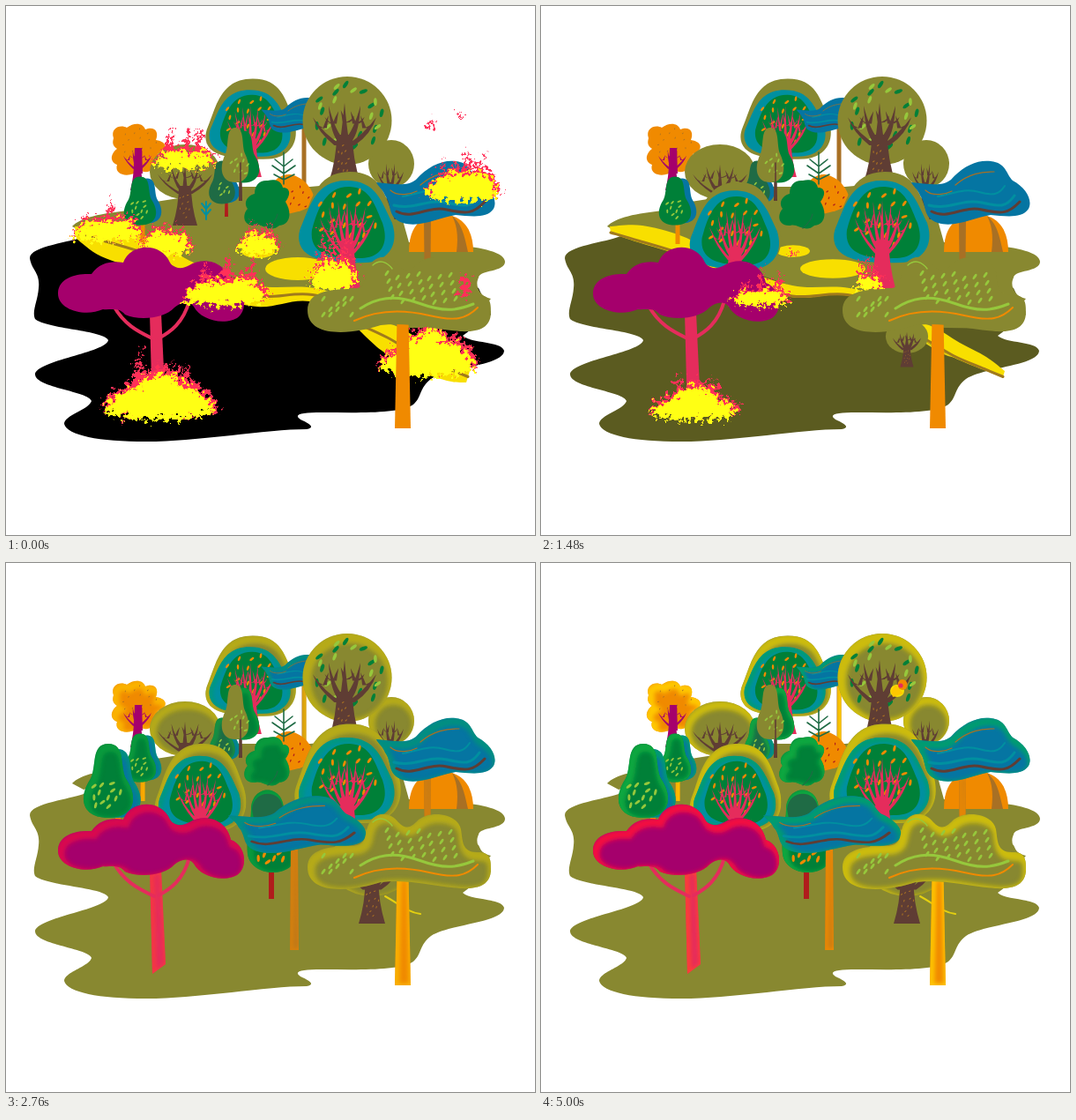
An HTML page for the animation above (6 s loop, 600 by 600 pixels).

```html
<!DOCTYPE html>
<html lang="en">
<head>
<meta charset="utf-8">
<title>Forest regrowth</title>
<style>
html, body { margin: 0; width: 100%; height: 100%; overflow: hidden; background: #fff; }
svg { display: block; width: 100vw; height: 100vh; }
.hi { opacity: var(--glow); }
</style>
</head>
<body>
<svg id="stage" viewBox="0 0 600 600">
  <defs>
    <filter id="soft" x="-20%" y="-20%" width="140%" height="140%"><feGaussianBlur stdDeviation="2.6"/></filter>
    <filter id="spray" filterUnits="userSpaceOnUse" x="0" y="80" width="600" height="420" color-interpolation-filters="sRGB">
      <feTurbulence id="grain" type="fractalNoise" baseFrequency=".2" numOctaves="4"/>
      <feDisplacementMap in="SourceGraphic" scale="24" xChannelSelector="R" yChannelSelector="G"/>
    </filter>
  </defs>
</svg>
<script>
const LOOP = 6000, STEP = 40;
const C = {
  olive: '#888830', gold: '#ccbc10', brown: '#5f3d34', bark: '#a87024', blue: '#0575a2', teal: '#0090a0',
  green: '#008038', leaf: '#10a840', deep: '#1f6b45', magenta: '#a5006c', red: '#f41040', pink: '#e52c5c',
  orange: '#f08a00', sun: '#ffc800', yellow: '#f8df00', lime: '#96c83c', sea: '#009c70', rust: '#b01c1c',
  flame: '#ff3058', hot: '#ffff14'
};
const svg = document.getElementById('stage');
const defs = svg.querySelector('defs');
const clamp = v => Math.max(0, Math.min(1, v));
const mix = (a, b, k) => a + (b - a) * k;
const span = (t, a, b) => clamp((t - a) / (b - a));
const rnd = n => { const v = Math.sin(n * 12.9898 + 4.1) * 43758.5453; return v - Math.floor(v); };

function el(tag, attrs, parent) {
  const e = document.createElementNS('http://www.w3.org/2000/svg', tag);
  for (const k in attrs) e.setAttribute(k, attrs[k]);
  return parent.appendChild(e);
}
const group = (parent = svg) => el('g', {}, parent);
const fill = (p, d, color) => el('path', { d, fill: color }, p);
const line = (p, d, color, w) => el('path', { d, fill: 'none', stroke: color, 'stroke-width': w, 'stroke-linecap': 'round' }, p);

let clips = 0;
// Shape with a soft inner light along its upper left side
function lit(p, d, color, light, w = 10) {
  const id = 'c' + clips++;
  fill(p, d, color);
  el('path', { d }, el('clipPath', { id }, defs));
  const g = el('g', { 'clip-path': `url(#${id})`, class: 'hi' }, p);
  const shift = w > 8 ? 'translate(2.5 4)' : 'translate(1.5 1.5)';
  el('path', { d, fill: 'none', stroke: light, 'stroke-width': w, filter: 'url(#soft)', transform: shift }, g);
}
const oval = (x, y, a, b) => `M${x - a} ${y}a${a} ${b} 0 1 1 ${2 * a} 0a${a} ${b} 0 1 1 ${-2 * a} 0Z`;
function pear(x, y, w, h) {
  const q = (...n) => n.map((v, i) => (i % 2 ? y + v * h : x + v * w).toFixed(1)).join(' ');
  return `M${q(0, -.5)}C${q(.36, -.5, .22, -.18, .36, -.02)}C${q(.62, .25, .5, .5, 0, .5)}` +
    `C${q(-.5, .5, -.62, .25, -.36, -.02)}C${q(-.22, -.18, -.36, -.5, 0, -.5)}Z`;
}
const post = (x, top, base, a, b) => `M${x - a} ${top}H${x + a}L${x + b} ${base}H${x - b}Z`;

// Tapered branch
const limb = (x, y, cx, cy, tx, ty, w) =>
  `M${x - w} ${y}Q${cx - w * .7} ${cy} ${tx} ${ty}Q${cx + w * .7} ${cy + w * .5} ${x + w} ${y}Z`;

// Trunk with a fan of branches
function fan(p, x, top, base, w, rx, ry, n, color, sw) {
  const m = (top + base) / 2;
  let d = `M${x - w} ${base}Q${x - w * .5} ${m} ${x - w * .5} ${top}H${x + w * .5}Q${x + w * .5} ${m} ${x + w} ${base}Z`;
  for (let i = 0; i < n; i++) {
    const a = i / (n - 1) * 2 - 1, tx = x + a * rx, ty = top - ry * Math.sqrt(1 - a * a * .7);
    const ox = x + a * w * .4, oy = top + Math.abs(a) * ry * .25 + 3;
    const cx = x + a * rx * .75, cy = mix(top, ty, .15);
    d += limb(ox, oy, cx, cy, tx, ty, sw);
    const bx = mix(x, tx, .62), by = mix(top, ty, .38), s = a < 0 ? 1 : -1;
    d += limb(bx, by, bx + s * rx * .04, by - ry * .2, bx + s * rx * .12, by - ry * .4, sw * .5);
    d += limb(bx, by, bx - s * rx * .2, by - ry * .02, bx - s * rx * .32, by - ry * .22, sw * .5);
  }
  fill(p, d, color);
}
function scatter(p, x, y, rx, ry, n, color, len, inner = .1, seed = 1) {
  for (let i = 0; i < n; i++) {
    const a = i * 2.4 + seed, r = mix(inner, 1, Math.sqrt((i + .5) / n));
    const px = x + Math.cos(a) * rx * r, py = y + Math.sin(a) * ry * r;
    el('ellipse', { rx: len, ry: len * .42, fill: color,
      transform: `translate(${px.toFixed(1)} ${py.toFixed(1)}) rotate(${Math.round(-100 + rnd(i) * 80)})` }, p);
  }
}

// Ground
const base = fill(svg, 'M90 261C75 268 27 272 27 286C29 300 39 302 37 320C36 335 29 346 33 355C45 366 112 368 116 379C114 393 34 402 33 418C34 433 94 437 97 448C94 458 66 464 66 474C70 488 110 495 170 494C240 491 300 480 341 480C351 478 345 474 334 469C325 463 336 461 358 461C400 461 445 463 462 452C472 443 468 434 482 423C505 409 564 408 565 391C562 380 528 383 518 374L550 350L536 320L400 250Z', '#000');
fill(svg, 'M75 250C84 240 108 235 140 232L170 222L215 215L240 205H345L400 200L445 225L457 268L510 272C540 273 566 280 566 290C566 302 537 299 536 308C531 318 538 330 550 332L520 366L395 364L350 322L285 318L215 293L165 264L115 250L88 257Z', C.olive);
line(svg, 'M430 378C445 386 455 396 470 398', '#e4d010', 2);
const ponds = [[331, 298, 37, 13], [286, 278, 19, 8]].map(([cx, cy, rx, ry]) =>
  ({ ry, e: el('ellipse', { cx, cy, rx, ry, fill: C.yellow }, svg) }));

const smooth = pts => pts.map((p, i) => {
  if (!i) return p.join(' ');
  const a = pts[i - 2] || pts[i - 1], b = pts[i - 1], c = pts[i + 1] || p;
  return `C${b[0] + (p[0] - a[0]) / 6} ${b[1] + (p[1] - a[1]) / 6} ${p[0] - (c[0] - b[0]) / 6} ${p[1] - (c[1] - b[1]) / 6} ${p[0]} ${p[1]}`;
}).join('');
const banks = [
  [[[78, 250], [115, 249], [165, 263], [215, 292], [285, 317], [350, 320], [420, 340]],
   [[80, 264], [108, 284], [160, 302], [215, 325], [285, 341], [345, 335], [420, 360]]],
  [[[395, 355], [440, 362], [475, 382], [505, 398], [526, 414]],
   [[395, 362], [425, 390], [460, 411], [500, 425], [522, 427]]]
].map(([up, low]) => ({ up, low, band: fill(svg, '', C.yellow), mid: line(svg, '', '#a07a1c', 3) }));
const between = (a, b, k) => a.map((p, i) => [mix(p[0], b[i][0], k), mix(p[1], b[i][1], k)]);

// Tree kinds
const rims = [];
const swell = k => `translate(388 250) scale(${1 + .09 * k}) translate(-388 -250)`;
function tealTree(p, x, y, sx, sy, grows) {
  const g = el('g', { transform: `translate(${x} ${y}) scale(${sx} ${sy}) translate(-388 -320)` }, p);
  const rim = el('g', { transform: swell(grows ? 0 : 1) }, g);
  if (grows) rims.push(rim);
  lit(rim, 'M335 250C345 225 350 188 390 188C425 188 430 215 440 240C450 272 432 290 410 291C375 292 350 290 338 278C331 270 331 260 335 250Z', C.olive, C.gold, 12);
  lit(g, 'M334 252C344 230 350 198 386 198C420 198 426 222 438 246C447 274 430 290 409 291C375 292 350 290 338 278C331 270 331 260 334 252Z', C.teal, C.sea, 8);
  fill(g, 'M347 254C354 228 364 204 390 205C414 206 419 228 427 246C435 270 425 285 404 286C375 287 343 284 347 254Z', C.green);
  scatter(g, 388, 240, 36, 34, 20, C.orange, 3.6, .15, 2);
  fan(g, 387, 266, 320, 15, 31, 46, 7, C.pink, 2.6);
}
function blueTree(p, x, y, sx, sy) {
  const g = el('g', { transform: `translate(${x} ${y}) scale(${sx} ${sy}) translate(-487 -212)` }, p);
  lit(g, 'M420 200C440 202 455 205 465 197C478 182 495 174 510 176C528 178 527 190 535 198C550 206 558 220 553 230C545 242 525 238 510 237C490 240 470 252 450 246C432 240 438 225 430 215C427 207 422 205 420 200Z', C.blue, C.sea);
  line(g, 'M443 233C462 243 478 226 500 231S530 236 543 222', C.brown, 3);
  line(g, 'M440 226C462 232 478 218 500 223S528 228 537 215', C.teal, 3);
  line(g, 'M450 216C468 213 480 206 497 211S520 213 526 204', C.teal, 2);
  line(g, 'M470 203C485 190 500 188 514 188M436 209C445 217 460 213 466 210', C.bark, 1.2);
}

// Far trees
const far = group();
tealTree(far, 278, 194, .85, .81);
lit(far, post(338, 130, 204, 2.5, 2.5), C.bark, C.sun, 5);
blueTree(far, 330, 124, .6, .55);
fill(far, 'M291 236C292 206 308 190 322 191C340 194 351 212 350 224C335 236 310 238 291 236Z', C.orange);
scatter(far, 332, 217, 14, 13, 8, C.rust, 1.6, .2, 3);
line(far, 'M315 166V202M315 182L305 174M315 182L325 174M315 190L302 181M315 190L328 181M315 197L304 191M315 197L327 191', C.deep, 1.6);
lit(far, oval(437, 179, 26, 27), C.olive, C.gold);
fan(far, 436, 200, 242, 7, 15, 22, 4, C.brown, 2);
lit(far, oval(387, 130, 50.5, 50), C.olive, C.gold, 14);
scatter(far, 387, 126, 42, 38, 14, C.green, 4.8, .55, 1);
scatter(far, 388, 122, 38, 34, 10, C.lime, 4.4, .5, 4);
fan(far, 384, 146, 200, 18, 36, 36, 5, C.brown, 4.5);
scatter(far, 382, 174, 8, 17, 11, C.bark, 1.5, .1, 2);

const bird = group();
fill(bird, oval(404, 145, 8, 7), C.yellow);
fill(bird, oval(410, 138, 5.5, 6), C.orange);
fill(bird, 'M397 145L402 138L411 148L399 152Z', C.sun);
fill(bird, oval(408, 139, 2.6, 2.6), C.pink);

lit(far, 'M122 150C118 138 130 134 137 138C145 132 155 132 158 140C168 136 174 142 170 152C184 154 184 164 172 168C172 186 160 192 152 186C140 196 122 192 126 180C116 176 120 166 126 162C120 158 121 154 122 150Z', C.orange, C.sun);
scatter(far, 150, 155, 22, 16, 14, C.bark, 1.1, .2, 5);
fan(far, 149, 178, 209, 8, 16, 15, 4, C.magenta, 1.8);
fill(far, 'M146 161H154L155 190H145Z', C.magenta);

const middle = group();
lit(middle, oval(203, 188, 40, 31), C.olive, C.gold);
fan(middle, 203, 204, 249, 14, 31, 24, 5, C.brown, 2.8);
scatter(middle, 203, 226, 7, 15, 10, C.bark, 1.3, .1, 1);
fill(middle, post(250, 220, 239, 1.6, 2), C.rust);
lit(middle, pear(250, 200, 30, 47), C.blue, C.sea, 8);
lit(middle, pear(245, 200, 30, 49), C.deep, C.leaf, 8);
scatter(middle, 246, 208, 8, 8, 6, C.lime, 2.2);
line(middle, 'M227 242V222M227 230l-5-6M227 230l5-6M227 237l-5-6M227 237l5-6', C.teal, 2);
fill(middle, post(266, 185, 221, 1.5, 2), C.brown);
lit(middle, pear(269, 171, 37, 59), C.green, C.leaf, 8);
fill(middle, pear(260, 169, 31, 62), C.olive);
scatter(middle, 266, 180, 11, 13, 9, C.lime, 2.4, .1, 3);
line(middle, 'M266 208V178', C.brown, 1.6);
lit(middle, 'M297 198C305 196 312 198 314 206C324 206 322 216 317 222C325 235 322 248 310 249C300 258 290 246 283 249C268 250 268 236 274 230C268 222 276 214 282 213C282 203 288 197 297 198Z', C.green, C.leaf);
line(middle, 'M297 252C304 246 307 241 308 236', C.deep, 1.2);
lit(middle, post(155, 240, 270, 2.5, 2.5), C.orange, C.sun, 4);
lit(middle, pear(160, 221, 33, 51), C.blue, C.sea, 8);
lit(middle, pear(152, 221, 37, 55), C.green, C.leaf, 8);
scatter(middle, 152, 230, 11, 11, 10, C.lime, 2.4);

tealTree(middle, 388, 320, 1, 1, true);
fill(middle, 'M457 279C457 250 470 237 495 236C520 238 530 255 530 279Z', C.orange);
fill(middle, 'M506 238C518 248 520 262 524 279H511C513 262 512 250 506 238Z', C.bark);
lit(middle, post(478, 240, 294, 4, 3.5), C.bark, C.orange, 6);
blueTree(middle, 487, 212, 1, 1);

const backFire = el('g', { filter: 'url(#spray)' }, svg);

// Growing trees
const sprouts = [];
function sprout(x, y, start, dur = 700) {
  const g = group();
  sprouts.push({ g, x, y, start, dur });
  return g;
}
tealTree(sprout(221, 326, 1000, 640), 221, 326, .86, .88, true);

const pearTree = sprout(120, 294, 1490);
fill(pearTree, post(127, 275, 296, 3, 3), C.orange);
lit(pearTree, pear(126, 250, 54, 78), C.blue, C.sea);
lit(pearTree, pear(116, 247, 57, 84), C.green, C.leaf);
scatter(pearTree, 113, 262, 18, 17, 12, C.lime, 3.6);

const dark = sprout(302, 380, 1490);
fill(dark, post(301, 340, 381, 3, 3), C.rust);
lit(dark, 'M278 280C278 250 315 250 315 280C318 295 332 310 330 330C328 358 278 358 274 330C272 310 278 295 278 280Z', C.green, C.leaf);
fill(dark, 'M279 279C281 256 313 256 314 279L311 296H282Z', C.deep);
scatter(dark, 301, 332, 17, 11, 8, C.orange, 4);

const small = sprout(415, 410, 1400);
lit(small, oval(415, 340, 48, 38), C.olive, C.gold);
fan(small, 415, 360, 409, 15, 32, 30, 5, C.brown, 4.5);
scatter(small, 415, 385, 8, 18, 12, C.bark, 1.4);

const lake = sprout(327, 438, 1490);
lit(lake, post(327, 318, 439, 4, 5), C.bark, C.orange, 7);
blueTree(lake, 330, 297, 1.16, .9);

// Front trees
const front = group();
lit(front, post(450, 355, 479, 6.5, 9), C.orange, C.sun, 7);
lit(front, 'M342 345C342 325 365 321 392 321C408 320 407 311 409 303C413 284 432 278 445 294C455 305 462 297 468 291C482 280 512 284 516 302C518 315 517 328 534 328C550 327 550 338 550 347C550 366 535 370 515 369C480 366 455 358 425 362C395 372 342 378 342 345Z', C.olive, C.gold, 12);
for (let i = 0; i < 38; i++) {
  const right = i < 28;
  const x = right ? 432 + i % 7 * 12 + (i / 7 | 0) * 2 : 360 + (i - 28) % 5 * 8;
  const y = right ? 303 + (i / 7 | 0) * 9 + (i * 5 % 7) : 332 + (i * 7 % 4) * 6;
  el('ellipse', { rx: 3.6, ry: 1.5, fill: C.lime, transform: `translate(${x} ${y}) rotate(-55)` }, front);
}
line(front, 'M402 343C420 331 440 327 468 337S510 346 530 338', C.lime, 3);
line(front, 'M395 357C420 345 450 344 480 351S522 355 535 342', C.orange, 2);
line(front, 'M416 294C424 287 432 290 438 298', C.lime, 1.4);

lit(front, 'M163 348H176L181 455L166 466Z', C.pink, '#ff4030', 6);
line(front, 'M122 340C135 363 152 370 168 378M208 334C201 360 186 370 173 377', C.pink, 4);
lit(front, 'M59 325C60 308 80 303 97 304C106 291 120 289 133 291C140 270 175 266 186 291C190 298 200 299 208 294C225 284 250 290 255 314C272 320 275 345 262 354C245 363 220 355 213 341C208 334 198 336 191 342C180 355 150 357 135 350C128 341 118 345 110 344C90 353 58 345 59 325Z', C.magenta, C.red);

// Fire: x, foot, half width, height, pink height, sizes at the key times
const frontFire = el('g', { filter: 'url(#spray)' }, svg);
const KEYS = [0, 680, 1480, 1880, 1960];
const fires = [
  [backFire, 200, 188, 34, 30, 60, [1, 0, 0, 0, 0]],
  [backFire, 113, 270, 38, 34, 62, [1, 0, 0, 0, 0]],
  [backFire, 180, 286, 30, 36, 42, [1, .45, 0, 0, 0]],
  [backFire, 285, 285, 23, 35, 42, [1, .95, .2, 0, 0]],
  [backFire, 371, 327, 26, 54, 104, [1, 1, .6, 0, 0]],
  [backFire, 516, 225, 41, 42, 74, [1, .68, 0, 0, 0]],
  [backFire, 478, 424, 54, 62, 70, [1, .08, 0, 0, 0]],
  [frontFire, 248, 343, 46, 46, 84, [1, .95, .68, .45, 0]],
  [frontFire, 174, 474, 62, 64, 96, [1, .9, .78, .4, 0]]
].map(([g, x, y, w, h, ph, sizes]) => ({ x, y, w, h, ph, sizes, pink: fill(g, '', C.flame), hot: fill(g, '', C.hot) }));
const sparks = group(frontFire);
[[482, 136, 3, 7], [515, 123, 3, 2], [520, 318, 6, 13]].forEach(a => fill(sparks, oval(...a), C.flame));

function sizeAt(sizes, t) {
  const i = KEYS.findIndex(k => t < k);
  return i < 0 ? 0 : mix(sizes[i - 1], sizes[i], span(t, KEYS[i - 1], KEYS[i]));
}
// Ragged mass of flame with uneven licks leaning to the right
function blaze(x, y, w, h, seed, tick) {
  const n = 40, top = [], foot = [];
  for (let i = 0; i <= n; i++) {
    const u = i / n, env = Math.pow(Math.sin(Math.PI * u), .5), px = x + (u * 2 - 1) * w;
    const k = u * 6, lump = mix(rnd(seed + Math.floor(k)), rnd(seed + Math.floor(k) + 1), k % 1);
    const lick = h * env * (.4 + .45 * lump + .2 * rnd(seed + i * 3 + tick));
    top.push(`${px + lick * .12} ${y - h * .2 - lick * .85}`);
    foot.unshift(`${px} ${y - h * .22 * (1 - env * .8) - 3 * rnd(i + seed + tick)}`);
  }
  return 'M' + top.concat(foot).join('L') + 'Z';
}
function tongues(x, y, w, h, seed, tick) {
  let d = '';
  for (let i = 0; i < 3; i++) {
    const tx = x + (i - 1.1) * w * .5, r = w * .12 + 2;
    const top = y - h * (i == 1 ? .8 : .6 + .3 * rnd(seed + i * 7)) * (.9 + .2 * rnd(seed + i + tick));
    const tip = tx + (rnd(seed + i * 5) - .2) * w * .35;
    d += limb(tx, y - 6, mix(tx, tip, .4) + r * .5, mix(y, top, .6), tip, top, r);
  }
  return d;
}

function pop(p) {
  const q = p - 1, s = 2.2;
  return p <= 0 ? 0 : 1 + (s + 1) * q * q * q + s * q * q;
}

function draw(t) {
  const heal = span(t, 680, 1880);
  base.setAttribute('fill', `rgb(${136 * heal},${136 * heal},${48 * heal})`);

  const sink = t < 1480 ? .45 * span(t, 1000, 1480) : mix(.45, 1, span(t, 1480, 1920));
  banks.forEach(b => {
    const low = between(b.low, b.up, sink), mid = between(b.up, b.low, .5);
    b.band.setAttribute('d', sink < 1 ? 'M' + smooth(b.up) + 'L' + smooth(low.reverse()) + 'Z' : '');
    b.mid.setAttribute('d', 'M' + smooth(mid));
    b.mid.setAttribute('opacity', 1 - span(t, 1480, 1800));
  });
  ponds.forEach(p => p.e.setAttribute('ry', p.ry * (1 - span(t, 1400, 1880))));

  sprouts.forEach(({ g, x, y, start, dur }) => {
    const k = pop(span(t, start, start + dur));
    g.setAttribute('display', k > 0 ? 'inline' : 'none');
    g.setAttribute('transform', `translate(${x} ${y}) scale(${k}) translate(${-x} ${-y})`);
  });

  const burning = t < 1960;
  [backFire, frontFire].forEach(g => g.setAttribute('display', burning ? 'inline' : 'none'));
  if (burning) {
    const tick = Math.floor(t / 80);
    document.getElementById('grain').setAttribute('seed', tick + 1);
    fires.forEach((f, i) => {
      const s = sizeAt(f.sizes, t), v = Math.pow(s, 1.2), seed = i * 31 + 2;
      f.hot.setAttribute('d', s > .02 ? blaze(f.x, f.y, f.w * s, f.h * v, seed, tick) : '');
      f.pink.setAttribute('d', s > .02 ? blaze(f.x + 1, f.y, f.w * s * 1.06, f.h * v * 1.16, seed, tick) +
        tongues(f.x, f.y, f.w * s, f.ph * v, seed, tick) : '');
    });
    sparks.setAttribute('opacity', t < 160 ? 1 : 0);
  }

  const p = span(t, 1960, 3840);
  svg.style.setProperty('--glow', 1 - (1 - p) * (1 - p));
  rims.forEach(r => r.setAttribute('transform', swell(span(t, 1880, 2120))));

  const peek = span(t, 3840, 4000), nod = Math.sin(span(t, 4200, 5000) * Math.PI * 4) * 8;
  bird.setAttribute('display', peek > 0 ? 'inline' : 'none');
  bird.setAttribute('transform', `rotate(${nod} 404 148) translate(404 146) scale(${peek}) translate(-404 -146)`);
}

const began = performance.now();
function frame() {
  const t = (performance.now() - began) % LOOP;
  draw(Math.floor(t / STEP) * STEP);
  requestAnimationFrame(frame);
}
frame();
</script>
</body>
</html>
```
